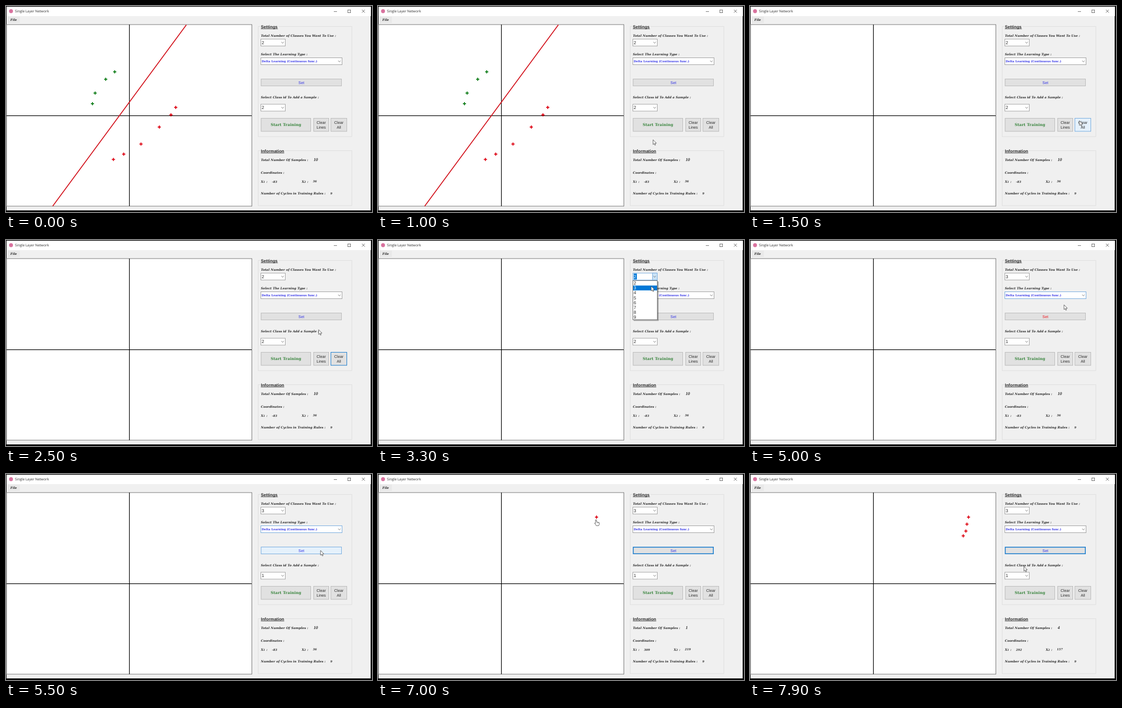
Recreate the animation shown at these times as an HTML page with a canvas. Size 690 by 388 pixels, loop 8000 ms.

```html
<!DOCTYPE html>
<html lang="en">
<head>
<meta charset="utf-8">
<title>Single Layer Network</title>
<style>
html, body { margin: 0; width: 100%; height: 100%; overflow: hidden; background: #000; }
canvas { display: block; width: 690px; height: 388px; }
</style>
</head>
<body>
<canvas id="stage" width="690" height="388"></canvas>
<script>
const ctx = document.getElementById('stage').getContext('2d');
const LOOP = 8000, STEP = 100;

// moments at which the window reacts, in ms
const WHEN = {
  enter: 400, hover: 1300, clear: 1400, leave: 2300, list: 3100, pick: 3500,
  types: 4300, type: 5000, over: 5300, set: 5500, away: 6000, sample: 7000
};
const GAP = 200;

const INK = '#2a2a2a', BLUE = '#0078d7', FOCUS = '#1f7fce', SOFT = '#79addf';
const EDGE = '#bcbcbc', FACE = '#e1e1e1', PANEL = '#f0f0f0', LINK = '#3434e6';
const RED = '#dd0010', GREEN = '#0a7a14';
const SERIF = '"DejaVu Serif", serif', SANS = '"Liberation Sans", Arial, sans-serif';
const LABEL = ['italic bold', 5.9, SERIF], NUMBER = ['italic bold', 5.3, SERIF];
const TYPE = ['bold', 5.43, SERIF], HEAD = ['bold', 8, SANS];
const DIGIT = ['', 8.3, SANS], BUTTON = ['', 7.3, SANS];
const DELTA = 'Delta Learning (Continuous func.)';
const PERCEPTRON = 'Perceptron Learning (Discrete Func.)';

const LEFT = 480.5, CX = 232, CY = 206;
const greens = [[205, 124], [188, 138], [168, 164], [163, 184]];
const reds = [[320, 191], [311, 205], [289, 228], [254.5, 260], [222, 279], [202.5, 289]];
const samples = [[412, 81.3], [409, 94.5], [407, 107.5], [402, 116.5]];

// pointer stops: time, x, y
const stops = [
  [WHEN.enter, 330, 318], [WHEN.clear, 621, 216], [2200, 621, 216], [3000, 521, 67],
  [3300, 515, 87], [WHEN.types, 628.5, 107], [WHEN.type, 592, 122],
  [WHEN.set, 593, 144], [5900, 593, 144], [6700, 411, 86],
  ...samples.map(([x, y], i) => [WHEN.sample + i * GAP, x - 1, y + 5]),
  [7900, 516.5, 174]
];

const during = (t, a, b) => t >= a && t < b;

function text(str, x, y, [style, size, family], color = INK, align = 'left') {
  // drawn large and scaled down so that small letters keep exact spacing
  ctx.save();
  ctx.translate(x, y);
  ctx.scale(0.1, 0.1);
  ctx.font = `${style} ${size * 10}px ${family}`;
  ctx.textRendering = 'geometricPrecision';
  ctx.textAlign = align;
  ctx.fillStyle = color;
  ctx.fillText(str, 0, 0);
  ctx.restore();
}

function rect(x, y, w, h, fill) {
  ctx.fillStyle = fill;
  ctx.fillRect(x, y, w, h);
}

function box(x, y, w, h, fill, edge, line = 1) {
  if (fill) rect(x, y, w, h, fill);
  ctx.strokeStyle = edge;
  ctx.lineWidth = line;
  ctx.strokeRect(x + line / 2, y + line / 2, w - line, h - line);
}

function stroke(points, color, width = 1) {
  ctx.beginPath();
  points.forEach(([x, y]) => ctx.lineTo(x, y));
  ctx.strokeStyle = color;
  ctx.lineWidth = width;
  ctx.stroke();
}

function plus([x, y], color) {
  stroke([[x - 3, y], [x + 3, y]], color, 1.7);
  stroke([[x, y - 3], [x, y + 3]], color, 1.7);
}

function combo(y, w, value, font, color, edge, open) {
  const x = 480, h = 14, cx = x + w - 5.5, cy = y + h / 2;
  box(x, y, w, h, '#fff', edge || '#a2a2a2');
  if (open) {
    rect(x + 2, y + 1.5, open, h - 3, BLUE);
    box(x + w - 10, y, 10, h, '#cce4f7', SOFT);
  }
  stroke([[cx - 2.3, cy - 1], [cx, cy + 1.2], [cx + 2.3, cy - 1]], '#666', 0.9);
  text(value, x + 2, cy + font[1] * 0.35, font, open ? '#fff' : color);
}

function button(x, y, w, h, lines, font, color, edge = EDGE, face = FACE, line = 1) {
  box(x, y, w, h, face, edge, line);
  const lead = 8.7, first = y + h / 2 + font[1] * 0.36 - lead * (lines.length - 1) / 2;
  lines.forEach((s, i) => text(s, x + w / 2, first + i * lead, font, color, 'center'));
}

function group(y, h, title, width) {
  box(475, y, 177.5, h, null, '#dfdfdf');
  rect(480, y - 2, width + 2, 5, PANEL);
  text(title, LEFT, y + 3.5, HEAD);
  rect(LEFT, y + 4.6, width, 0.8, INK);
}

function chrome() {
  rect(0, 0, 690, 388, '#050505');
  rect(1, 1.5, 686.5, 383.5, PANEL);
  rect(1, 1.5, 687, 17.5, '#fff');
  ctx.beginPath();
  ctx.arc(9.5, 9.7, 3.7, 0, 7);
  ctx.fillStyle = '#d9739f';
  ctx.fill();
  text('Single Layer Network', 17, 12.2, ['', 6.5, '"Open Sans", sans-serif']);
  stroke([[618, 10.5], [624, 10.5]], '#777');
  box(644, 7, 6, 6, null, '#555', 0.8);
  stroke([[671, 7], [676.5, 12.5]], '#444', 0.8);
  stroke([[676.5, 7], [671, 12.5]], '#444', 0.8);
  rect(3, 20, 23, 12, '#e9e9e9');
  text('File', 8.2, 27.8, LABEL);
}

function plot(t) {
  box(0.5, 34.5, 463.5, 343, '#fff', '#777');
  rect(CX, 35, 1.2, 342, '#000');
  rect(1, CY, 462, 1.2, '#000');
  if (t < WHEN.clear) {
    stroke([[340, 35.5], [88, 377]], '#d2101a', 1.7);
    greens.forEach(p => plus(p, GREEN));
    reds.forEach(p => plus(p, RED));
  }
  samples.slice(0, sampleCount(t)).forEach(p => plus(p, RED));
}

function sampleCount(t) {
  const n = Math.floor((t - WHEN.sample) / GAP) + 1;
  return Math.max(0, Math.min(samples.length, n));
}

function settings(t) {
  const picked = t >= WHEN.pick;
  const delta = !picked || t >= WHEN.type, ready = !picked || t >= WHEN.set;
  group(38, 208.5, 'Settings', 32);
  text('Total Number of Classes You Want To Use :', LEFT, 58.2, LABEL);
  text('Select The Learning Type :', LEFT, 93.3, LABEL);
  text('Select Class id To Add a Sample :', LEFT, 173.5, LABEL);

  combo(61.8, 47, picked ? 3 : 2, DIGIT, INK,
    during(t, WHEN.list, 4400) && SOFT, during(t, WHEN.list, WHEN.pick) && 6);
  combo(97, 154, delta ? DELTA : PERCEPTRON, TYPE, LINK,
    during(t, WHEN.type, 5700) && SOFT, during(t, WHEN.types, WHEN.type) && 115);
  combo(184.5, 47, picked ? 1 : 2, DIGIT, INK);

  const over = during(t, WHEN.over, WHEN.away), focus = t >= WHEN.away;
  button(LEFT, 137, 152.5, 14, ['Set'], BUTTON, ready ? LINK : '#f01820',
    over ? SOFT : focus ? FOCUS : EDGE, over ? '#e5f1fb' : FACE, focus ? 1.6 : 1);
  button(LEFT, 211, 94.5, 25.5, ['Start Training'], ['bold', 7.26, SERIF], '#3a863f');
  button(579.5, 211, 29.5, 25.5, ['Clear', 'Lines'], BUTTON, INK);
  const hot = during(t, WHEN.hover, WHEN.leave);
  button(612, 211, 31, 25.5, ['Clear', 'All'], BUTTON, INK,
    hot ? SOFT : during(t, WHEN.leave, WHEN.list) ? FOCUS : EDGE, hot ? '#e5f1fb' : FACE);
}

function info(t) {
  const n = sampleCount(t), last = samples[n - 1];
  const coords = last
    ? [Math.round((last[0] - CX) / 0.5825), Math.round((CY - last[1]) / 0.57)]
    : [-83, 36];
  group(272, 104.5, 'Information', 44);
  text('Total Number Of Samples :', LEFT, 291.6, LABEL);
  text(n || 10, 580, 292.2, ['italic bold', 8.2, '"Liberation Serif", serif']);
  text('Coordinates :', LEFT, 315.6, LABEL);
  coords.forEach((value, i) => {
    const x = LEFT + i * 77;
    text('X', x, 332.8, LABEL);
    text(i + 1, x + 4.6, 333, ['italic bold', 4.8, SERIF]);
    text(':', x + 10.2, 332.8, LABEL);
    text(value, x + 21, 333 - i * 1.4, NUMBER);
  });
  text('Number of Cycles in Training Rules :', LEFT, 355.1, LABEL);
  text(9, 611.5, 355.3, NUMBER);
}

// drop-down list whose rows slide out from under its top edge
function list(y, w, items, row, chosen, shown, font, color) {
  const x = 480, full = items.length * row + 1.2, h = full * shown;
  rect(x + 2, y + 2, w, h, 'rgba(0,0,0,.3)');
  rect(x, y, w, h, '#fff');
  ctx.save();
  ctx.beginPath();
  ctx.rect(x, y, w, h);
  ctx.clip();
  items.forEach((s, i) => {
    const top = y + h - full + 0.6 + i * row;
    if (i === chosen) rect(x + 1, top, w - 2, row, BLUE);
    text(s, x + 2, top + row / 2 + font[1] * 0.36, font, i === chosen ? '#fff' : color);
  });
  ctx.restore();
  box(x, y, w, h, null, '#555', 0.8);
}

function lists(t) {
  if (during(t, WHEN.list, WHEN.pick)) {
    const digits = Array.from({ length: 8 }, (_, i) => i + 2);
    list(76, 47, digits, 9.15, t < 3200 ? 0 : 1, 1, DIGIT, INK);
  }
  if (during(t, WHEN.types, WHEN.type)) {
    const shown = Math.min(1, 0.6 + (t - WHEN.types) / 250);
    list(111, 154, [PERCEPTRON, DELTA], 10.2, t < 4700 ? 0 : 1, shown, TYPE, LINK);
  }
}

function shape(points, x, y) {
  ctx.beginPath();
  points.forEach(([dx, dy]) => ctx.lineTo(x + dx, y + dy));
  ctx.closePath();
  ctx.fillStyle = '#fff';
  ctx.fill();
  ctx.strokeStyle = '#444';
  ctx.lineWidth = 0.8;
  ctx.stroke();
}

function hand(x, y) {
  shape([[-1, 0.3], [1, 0.3], [1, 4], [6, 5.2], [6.4, 8], [5, 11],
    [0.4, 11], [-2.6, 6.2], [-1, 6.4]], x, y);
  [2.7, 4.4].forEach(d => stroke([[x + d, y + 4.8], [x + d, y + 6.4]], '#555', 0.6));
}

function arrow(x, y) {
  shape([[0, 0], [0, 9], [2, 7.2], [3.4, 10.3], [4.8, 9.7], [3.5, 6.7], [6.3, 6.5]], x, y);
}

function pointer(t) {
  const i = stops.findIndex(s => s[0] > t);
  if (i === 0) return;
  const b = i < 0 ? stops[stops.length - 1] : stops[i];
  const a = i < 0 ? b : stops[i - 1];
  const k = a === b ? 1 : (t - a[0]) / (b[0] - a[0]);
  const ease = k * k * (3 - 2 * k);
  const x = a[1] + (b[1] - a[1]) * ease, y = a[2] + (b[2] - a[2]) * ease;
  (t > WHEN.set && x < 463 ? hand : arrow)(x, y);
}

const layers = [chrome, plot, settings, info, lists, pointer];
const start = performance.now();
function tick() {
  const t = Math.floor((performance.now() - start) % LOOP / STEP) * STEP;
  layers.forEach(draw => draw(t));
  requestAnimationFrame(tick);
}
tick();
</script>
</body>
</html>
```
